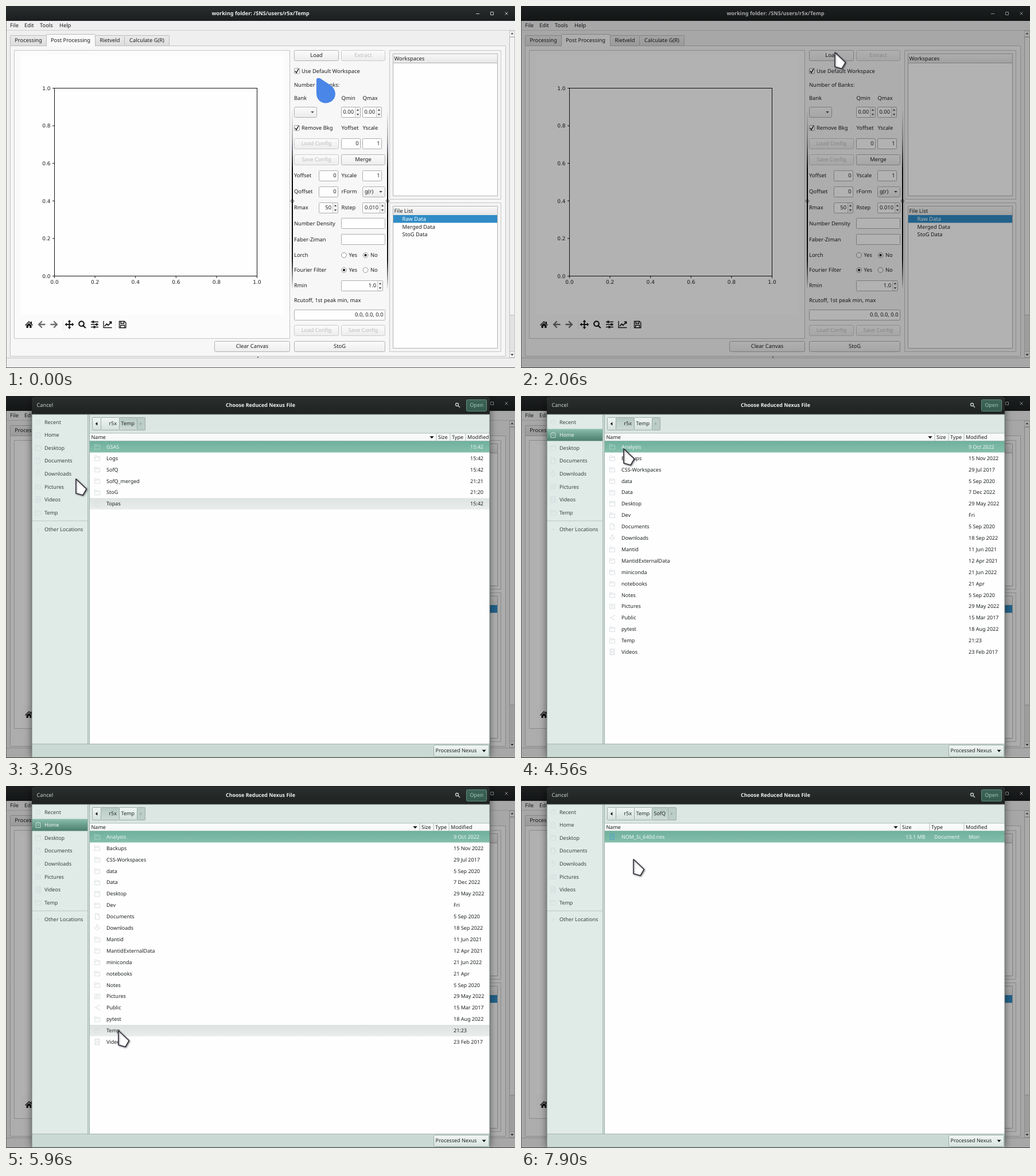
Recreate the animation shown at these times as an HTML page with a canvas. Size 887 px wide and 632 px high, loop 8000 ms.

```html
<!DOCTYPE html>
<html lang="en">
<head>
<meta charset="utf-8">
<title>Choosing a file</title>
<style>
html, body { margin: 0; width: 100%; height: 100%; overflow: hidden; background: #efefef; }
canvas { display: block; }
</style>
</head>
<body>
<canvas id="stage" width="887" height="632"></canvas>
<script>
const LOOP = 8000;
const ctx = document.getElementById('stage').getContext('2d');
ctx.textRendering = 'geometricPrecision';

// ---------- drawing helpers ----------
// y is the middle of the capitals; baselines sit on whole pixels
function text(str, x, y, { color = '#1c1f20', align = 'left', size = 9.35, weight = 400, family = '"Noto Sans", sans-serif' } = {}) {
  ctx.font = `${weight} ${size}px ${family}`;
  ctx.fillStyle = color;
  ctx.textAlign = align;
  ctx.fillText(str, x, Math.round(y + 3.3));
}
function fill(x, y, w, h, color) {
  ctx.fillStyle = color;
  ctx.fillRect(x, y, w, h);
}
function vGradient(y, h, ...colors) {
  const g = ctx.createLinearGradient(0, y, 0, y + h);
  colors.forEach((c, i) => g.addColorStop(i / (colors.length - 1), c));
  return g;
}
function box(x, y, w, h, bg, border, radius = 0) {
  ctx.beginPath();
  ctx.roundRect(x + .5, y + .5, w - 1, h - 1, radius);
  if (bg) { ctx.fillStyle = bg; ctx.fill(); }
  if (border) { ctx.strokeStyle = border; ctx.lineWidth = 1; ctx.stroke(); }
}
function path(d, x, y, { stroke, fill: bg, width = 1 }) {
  const p = new Path2D(d);
  ctx.save();
  ctx.translate(x, y);
  if (bg) { ctx.fillStyle = bg; ctx.fill(p); }
  if (stroke) { ctx.strokeStyle = stroke; ctx.lineWidth = width; ctx.stroke(p); }
  ctx.restore();
}
const UP = 'M-2.3 1.2L0-1.5 2.3 1.2Z', DOWN = 'M-2.8-1.4L0 1.6 2.8-1.4Z';

// ---------- main window ----------
function button(label, x, y, w, { enabled = true, pressed = false } = {}) {
  const bg = pressed ? vGradient(y, 19, '#cdcdcd', '#dcdcdc') : vGradient(y, 19, '#fcfcfc', '#ececec');
  box(x, y, w, 19, bg, enabled ? '#b0b0b0' : '#cacaca', 2);
  text(label, x + w / 2, y + 9, { align: 'center', color: enabled ? '#1c1f20' : '#bcbcbc' });
}
function field(value, x, y, w, spin) {
  box(x, y, w, 19, '#fefefe', '#adadad', 1);
  text(value, x + w - (spin ? 12 : 3.5), y + 9, { align: 'right' });
  if (!spin) return;
  fill(x + w - 10, y + 1, 9, 17, '#f4f4f4');
  fill(x + w - 10, y + 1, 1, 17, '#c8c8c8');
  path(UP, x + w - 5, y + 5.5, { fill: '#444' });
  path('M-2.3-1.2L0 1.5 2.3-1.2Z', x + w - 5, y + 13.5, { fill: '#444' });
}
function combo(value, x, y, w) {
  box(x, y, w, 19, vGradient(y, 19, '#fbfbfb', '#ebebeb'), '#b0b0b0', 2);
  text(value, x + 4, y + 9);
  path(DOWN, x + w - 8, y + 9.5, { fill: '#444' });
}
function check(label, y) {
  box(502, y - 5, 10, 10, '#fff', '#999', 1);
  path('M-3 0L-1 3 3-4', 507, y, { stroke: '#222', width: 1.5 });
  text(label, 515, y);
}
function radio(label, x, y, on) {
  ctx.beginPath();
  ctx.arc(x, y, 4.4, 0, 7);
  ctx.fillStyle = '#fff'; ctx.fill();
  ctx.strokeStyle = '#929292'; ctx.lineWidth = 1; ctx.stroke();
  if (on) { ctx.beginPath(); ctx.arc(x, y, 2.2, 0, 7); ctx.fillStyle = '#222'; ctx.fill(); }
  text(label, x + 8.5, y);
}
function tree(title, y) {
  box(668, y, 195, 261, '#f4f4f4', '#c6c6c6');
  box(674, y + 6, 183, 249, '#fefefe', '#b4b4b4');
  box(674, y + 6, 183, 17, vGradient(y + 6, 17, '#f8f8f8', '#e6e6e6'), '#b4b4b4');
  text(title, 676.5, y + 14.5);
}
function splitter(x) {
  fill(x - 1, 180, 2, 315, vGradient(180, 315, 'rgba(20,20,40,0)', 'rgba(20,20,40,.35)', '#080808', '#000', '#000', '#111', 'rgba(0,0,0,0)'));
  path('M-3.5 0L-1-2.5V2.5ZM3.5 0L1-2.5V2.5Z', x, 340.5, { fill: '#fff', stroke: '#333', width: .7 });
}
function plot() {
  box(14, 77, 481, 504, '#fbfbfb', '#c4c4c4');
  fill(26, 86, 458, 453, '#fefefe');
  ctx.strokeStyle = '#111';
  ctx.lineWidth = 1;
  ctx.strokeRect(84.5, 143.5, 353, 328);
  const label = { size: 9, family: '"DejaVu Sans", sans-serif' };
  for (let i = 0; i <= 5; i++) {
    const x = 84.5 + i * 70.6, y = 471.5 - i * 65.6, value = (i / 5).toFixed(1);
    fill(x - .5, 472, 1, 3, '#111');
    fill(81, y - .5, 3, 1, '#111');
    text(value, x, 482, { ...label, align: 'center' });
    text(value, 77.5, y, { ...label, align: 'right' });
  }
}
function plotTools() {
  const y = 556, dark = '#161616', gray = '#6d6d6d';
  path('M-7 1L0-6 7 1 6 2 0-4-6 2ZM-4.5 1.5L0-2.5 4.5 1.5V6H1.2V2.5H-1.2V6H-4.5ZM3-5H5V-1L3-3Z', 40, y, { fill: dark });
  const arrow = 'M-6.5 0L0-6.5 1.5-5-2-1.3H6.5V1.3H-2L1.5 5 0 6.5Z';
  path(arrow, 62, y, { fill: gray });
  ctx.save();
  ctx.translate(168, 0);
  ctx.scale(-1, 1);
  path(arrow, 84, y, { fill: gray });
  ctx.restore();
  path('M-6 0H6M0-6V6', 110.5, y, { stroke: dark, width: 2 });
  path('M0-8L3-4.5H-3ZM0 8L3 4.5H-3ZM-8 0L-4.5-3V3ZM8 0L4.5-3V3Z', 110.5, y, { fill: dark });
  path('M3.3-1.3A4.3 4.3 0 1 1-5.3-1.3 4.3 4.3 0 1 1 3.3-1.3M2 2L6.3 6.3', 132.5, y, { stroke: dark, width: 2.2 });
  path('M-6.5-4.5H6.5M-6.5 0H6.5M-6.5 4.5H6.5', 154.5, y, { stroke: dark, width: 1.5 });
  path('M-4-6.5H-1V-2.5H-4ZM2-2H5V2H2ZM-2 2.5H1V6.5H-2Z', 154.5, y, { fill: dark });
  path('M-7-6V5.5H7.5', 177, y, { stroke: dark, width: 1.3 });
  path('M-5 3L-1.5-1 1 1.5 6-4M2.8-4.7H6.5V-1', 177, y, { stroke: dark, width: 1.8 });
  path('M-5.5-5.5H3.5L5.8-3V5.8H-5.5ZM-3-5V-1.8H2.5V-5M-3.3 5V1.2H3.5V5', 203, y, { stroke: dark, width: 1.4 });
  fill(99, 548, 1, 16, '#e6e6e6');
  fill(190, 548, 1, 16, '#e6e6e6');
}
function controls(pressed) {
  button('Load', 502, 77, 78, { pressed });
  button('Extract', 584, 77, 77, { enabled: false });
  check('Use Default Workspace', 113.5);
  text('Number of Banks:', 502, 138);
  text('Bank', 502, 160.5);
  text('Qmin', 584.5, 160.5);
  text('Qmax', 621.5, 160.5);
  combo('', 502, 176, 40);
  field('0.00', 584, 176, 34, true);
  field('0.00', 621, 176, 34, true);
  check('Remove Bkg', 213);
  text('Yoffset', 584.5, 213);
  text('Yscale', 621.5, 213);
  button('Load Config', 502, 231, 78, { enabled: false });
  field('0', 584, 231, 34);
  field('1', 621, 231, 34);
  button('Save Config', 502, 259, 78, { enabled: false });
  button('Merge', 584, 259, 77);
  text('Yoffset', 502, 296);
  field('0', 545, 287, 34);
  text('Yscale', 584.5, 296);
  field('1', 621, 287, 34);
  text('Qoffset', 502, 324);
  field('0', 545, 315, 34);
  text('rForm', 584.5, 324);
  combo('g(r)', 621, 315, 40);
  text('Rmax', 502, 352);
  field('50', 545, 343, 34, true);
  text('Rstep', 584.5, 352);
  field('0.010', 621, 343, 40, true);
  text('Number Density', 502, 380);
  field('', 584, 370, 77);
  text('Faber-Ziman', 502, 408);
  field('', 584, 398, 77);
  text('Lorch', 502, 435);
  text('Fourier Filter', 502, 461);
  [[435, false], [461, true]].forEach(([y, yes]) => {
    radio('Yes', 589, y, yes);
    radio('No', 626.5, y, !yes);
  });
  text('Rmin', 502, 488);
  field('1.0', 584, 479, 73, true);
  text('Rcutoff, 1st peak min, max', 502, 514);
  field('0.0, 0.0, 0.0', 502, 530, 159);
  button('Load Config', 502, 557, 78, { enabled: false });
  button('Save Config', 584, 557, 77, { enabled: false });
  button('Clear Canvas', 363, 585, 132);
  button('StoG', 502, 585, 159);
}
function mainWindow(pressed) {
  fill(0, 0, 887, 632, '#efefef');
  fill(0, 0, 887, 26, vGradient(0, 26, '#2a2e2f', '#1b1e1f'));
  text('working folder: /SNS/users/r5x/Temp', 443.5, 13, { color: '#eee', align: 'center', size: 9.2, weight: 700 });
  fill(819, 13, 6, 1, '#ccc');
  box(844, 10, 6, 6, null, '#ccc');
  path('M-2.5-2.5L2.5 2.5M2.5-2.5L-2.5 2.5', 872, 13, { stroke: '#ccc' });
  [['File', 7], ['Edit', 32], ['Tools', 59], ['Help', 93]].forEach(([s, x]) => text(s, x, 33.5));
  fill(0, 42, 887, 1, '#cfcfcf');

  box(7, 69, 864, 543, '#f7f7f7', '#c2c2c2');
  [['Processing', 7, 64], ['Rietveld', 155, 52], ['Calculate G(R)', 206, 79]].forEach(([s, x, w]) => {
    box(x, 51, w, 19, vGradient(51, 19, '#ebebeb', '#dcdcdc'), '#bcbcbc', 1);
    text(s, x + w / 2, 60, { align: 'center' });
  });
  box(70, 49, 86, 22, '#f9f9f9', '#bcbcbc', 1);
  fill(71, 69, 84, 3, '#f8f8f8');
  text('Post Processing', 112.5, 59.5, { align: 'center' });

  plot();
  plotTools();
  controls(pressed);
  splitter(499);
  splitter(665);
  tree('Workspaces', 77);
  tree('File List', 343);
  fill(675, 365, 181, 13.5, '#308cc6');
  text('Raw Data', 690.5, 372, { color: '#fff' });
  text('Merged Data', 690.5, 385.5);
  text('StoG Data', 690.5, 398.5);

  box(877, 43, 10, 571, '#e2e2e2', '#c6c6c6');
  box(877, 54, 10, 486, '#f3f3f3', '#bcbcbc');
  box(877, 43, 10, 11, '#f3f3f3', '#c6c6c6');
  box(877, 603, 10, 11, '#f3f3f3', '#c6c6c6');
  path(UP, 882, 48, { fill: '#333' });
  path(DOWN, 882, 609, { fill: '#333' });
  fill(0, 614, 887, 1, '#c4c4c4');
  fill(438, 612.5, 2, 1.5, '#555');
  fill(0, 26, 1, 606, '#8a8a8a');
  fill(0, 631, 887, 1, '#5a5a5a');
}

// ---------- file dialog ----------
const PLACES = ['Recent', 'Home', 'Desktop', 'Documents', 'Downloads', 'Pictures', 'Videos', 'Temp'];
const TEMP_ROWS = ['GSAS|15:42', 'Logs|15:42', 'SofQ|15:42', 'SofQ_merged|21:21', 'StoG|21:20', 'Topas|15:42'];
const HOME_ROWS = ['Analysis|9 Oct 2022', 'Backups|15 Nov 2022', 'CSS-Workspaces|29 Jul 2017', 'data|5 Sep 2020',
  'Data|7 Dec 2022', 'Desktop|29 May 2022', 'Dev|Fri', 'Documents|5 Sep 2020', 'Downloads|18 Sep 2022',
  'Mantid|11 Jun 2021', 'MantidExternalData|12 Apr 2021', 'miniconda|21 Jun 2022', 'notebooks|21 Apr',
  'Notes|5 Sep 2020', 'Pictures|29 May 2022', 'Public|15 Mar 2017', 'pytest|18 Aug 2022', 'Temp|21:23', 'Videos|23 Feb 2017'];
// cols: left edges of Size, Type and Modified
const FOLDERS = {
  start: { rows: TEMP_ROWS, cols: [750, 774, 801], dateX: 809, crumbs: 2, active: 1 },
  home: { rows: HOME_ROWS, cols: [721, 745, 772], dateX: 780, crumbs: 2, active: 0 },
  temp: { rows: TEMP_ROWS, cols: [721, 745, 772], dateX: 780, crumbs: 2, active: 1 },
  sofq: { rows: ['NOM_Si_640d.nxs|Mon'], cols: [661, 712, 772], dateX: 780, crumbs: 3, active: 2 },
};
const ROW_TOP = 78.7, ROW_H = 19.9;

const ICONS = {
  folder: 'M-4.5-4H-1L0-2.5H4.5V4.5H-4.5ZM-4.5-1H1L2-2.5',
  Documents: 'M-3.5-5H1L3.5-2.5V5H-3.5ZM1-5V-2.5H3.5',
  Downloads: 'M-1.5-5H1.5V0H4.5L0 4.5-4.5 0H-1.5Z',
  Pictures: 'M-4.5-3.5H4.5V4H-4.5ZM2 0A2 2 0 1 1-2 0 2 2 0 1 1 2 0',
  Videos: 'M-4-5H4V5H-4ZM-2-5V5M2-5V5M-2 0H2',
  Desktop: 'M-4.5-4H4.5V4.5H-4.5ZM-4.5-2H4.5',
  Public: 'M4-4L-3 0 4 4M-3-1V1M4-5V-3M4 3V5',
  Home: 'M-4-3H-1.5V-4.5H1.5V-3H4V4.5H-4ZM-1.5 0H1.5',
  Recent: 'M4 0A4 4 0 1 1-4 0 4 4 0 1 1 4 0M0-2V0H2',
};
const icon = (name, x, y, color) => path(ICONS[name] || ICONS.folder, x, y, { stroke: color });
const small = (str, x, y, opts) => text(str, x, y, { size: 9, ...opts });

function sidebar(selected) {
  fill(45, 32, 98, 575, '#e0eae7');
  PLACES.forEach((name, i) => {
    const y = 45.4 + i * 22.57, on = name === selected;
    if (on) fill(45, y - 10.5, 98, 21, vGradient(y - 10.5, 21, '#8dbfae', '#689d8b', '#4c7e6e'));
    icon(name, 56, y, on ? '#c4dcd3' : '#d3dddf');
    small(name, 67, y, { color: on ? '#f4faf7' : '#37413e' });
  });
  fill(45, 217.5, 98, 1, '#bccac5');
  path('M-3 0H3M0-3V3', 56, 233, { stroke: '#d5dfde' });
  small('Other Locations', 67, 232.5, { color: '#37413e' });
  fill(142, 32, 4, 575, '#c9d8d3');
  fill(142, 32, 1, 575, '#a6b9b2');
  fill(145, 32, 1, 575, '#9fb2ab');
}
function pathBar({ crumbs, active }) {
  fill(146, 32, 697, 33, '#dce6e3');
  const parts = ['', 'r5x', 'Temp', 'SofQ'].slice(0, crumbs + 1).concat('');
  const edges = [150, 165, 197, 228, 256].slice(0, crumbs + 2);
  edges.push(edges[crumbs + 1] + 14);
  parts.forEach((label, i) => {
    const x = edges[i], w = edges[i + 1] - x + 1, last = i === parts.length - 1;
    const bg = i === active + 1 ? vGradient(37, 23, '#b8cac3', '#cddad5') : last ? '#bccdc7' : vGradient(37, 23, '#f0f6f4', '#d3e0db');
    box(x, 37, w, 23, bg, '#9aaea7', 1);
    if (label) small(label, edges[i + 1] - 4, 48, { align: 'right', color: '#1d2624' });
  });
  path('M1.8-3V3L-1.8 0Z', 157.5, 48.5, { fill: '#111' });
  path('M-1.5-2.5V2.5L1.5 0Z', edges[crumbs + 1] + 7, 48.5, { fill: '#93a59e' });
}
function fileList({ rows, cols, dateX }, selected, hovered) {
  fill(146, 65, 697, 14, vGradient(65, 14, '#fcfdfd', '#f3f6f5'));
  fill(146, 64.5, 697, 1, '#aebeb8');
  fill(146, 78, 697, 1, '#aebeb8');
  small('Name', 148.5, 71.5);
  path('M-3.8-1.8H3.8L0 2.2Z', cols[0] - 8, 72, { fill: '#111' });
  ['Size', 'Type', 'Modified'].forEach((s, i) => {
    fill(cols[i] - .5, 65, 1, 13, '#aebeb8');
    small(s, cols[i] + 3, 71.5);
  });
  fill(146, 79, 697, 528, '#fefefe');
  rows.forEach((row, i) => {
    const [name, date] = row.split('|'), top = ROW_TOP + i * ROW_H, y = top + 9.8;
    const on = i === selected, color = on ? '#eef7f3' : '#1c2221', isFile = name.endsWith('.nxs');
    if (on) fill(146, top, 697, ROW_H, vGradient(top, ROW_H, '#6fb09c', '#85bfac'));
    else if (i === hovered) fill(146, top, 697, ROW_H, vGradient(top, ROW_H, '#dde3e1', '#e9edec'));
    icon(isFile ? 'Documents' : name, 159, y, isFile ? '#4aa3c8' : on ? '#a6d0c3' : '#d9dee1');
    if (isFile) {
      path('M-2-1H2M-2 1.5H2', 159, y, { stroke: '#4aa3c8' });
      small('13.1 MB', 704.5, y, { align: 'right', color });
      small('Document', 720, y, { color });
    }
    small(name, 175, y, { color });
    small(date, dateX, y, { color });
  });
}
function dialog(folder, place, selected, hovered) {
  ctx.save();
  ctx.shadowColor = 'rgba(0,0,0,.55)';
  ctx.shadowBlur = 13;
  fill(45, 4, 798, 627, '#cbd9d5');
  ctx.restore();
  ctx.beginPath();
  ctx.roundRect(45, 1, 798, 31, [5, 5, 0, 0]);
  ctx.fillStyle = vGradient(1, 31, '#2b302f', '#1e2221');
  ctx.fill();
  small('Cancel', 53.5, 16, { color: '#c9d1ce', size: 9.2 });
  text('Choose Reduced Nexus File', 443.5, 16, { align: 'center', color: '#eef2f0', size: 8.95, weight: 700 });
  path('M1.5-1A2.5 2.5 0 1 1-3.5-1 2.5 2.5 0 1 1 1.5-1M1 1L4 4', 787, 16, { stroke: '#ccd3d0', width: 1.3 });
  box(802, 6, 36, 21, vGradient(6, 21, '#3d6457', '#345a4d'), '#64907f', 2);
  small('Open', 820, 16, { align: 'center', color: '#9cc5b5', size: 9.2 });
  sidebar(place);
  pathBar(folder);
  fileList(folder, selected, hovered);
  fill(45, 607, 798, 24, '#cbd9d5');
  fill(45, 607, 798, 1, '#a3b5ae');
  box(745, 609, 97, 21, vGradient(609, 21, '#f1f6f4', '#d7e3de'), '#9aaea7', 2);
  small('Processed Nexus', 748.5, 619);
  path('M-3.5-1.8H3.5L0 2.2Z', 833, 619.5, { fill: '#111' });
  ctx.strokeStyle = '#6c7a75';
  ctx.lineWidth = 1;
  ctx.strokeRect(45, 32, 798, 599);
}

// ---------- pointer ----------
const TRACK = [
  [0, 541, 126], [30, 541, 126], [330, 538, 101], [630, 547, 81],
  [2860, 547, 81], [3030, 350, 186], [3200, 122, 145], [3450, 84, 82], [3630, 76, 67],
  [4230, 76, 67], [4560, 179, 92], [5030, 186, 220], [5600, 197, 405], [5860, 196, 427],
  [6350, 196, 427], [6700, 213, 188], [6800, 210, 142], [7050, 201, 126], [7530, 196, 128], [LOOP, 196, 128],
];
function pointerAt(t) {
  const i = Math.max(1, TRACK.findIndex(k => k[0] >= t));
  const [t0, x0, y0] = TRACK[i - 1], [t1, x1, y1] = TRACK[i];
  const u = Math.max(0, (t - t0) / (t1 - t0));
  return [x0 + (x1 - x0) * u, y0 + (y1 - y0) * u];
}
function drawPointer(t) {
  const [x, y] = pointerAt(t);
  if (t < 330) {
    path('M0 3C0-1 5-1 9 2L24 12C34 19 36 31 28 39 20 46 7 45 2 35-1 30 0 20 0 3Z', x, y, { fill: '#4a86e8' });
    return;
  }
  ctx.save();
  ctx.shadowColor = 'rgba(0,0,0,.45)';
  ctx.shadowBlur = 3;
  ctx.shadowOffsetX = ctx.shadowOffsetY = 1;
  ctx.lineJoin = 'round';
  path('M0 0L0 25 12 28.5 18.5 17.5Z', x, y, { fill: '#fff', stroke: '#35303b', width: 1.6 });
  ctx.restore();
}

// ---------- timeline ----------
function hoveredRow(t) {
  if (t > 3050 && t < 3830) return 5;
  const [x, y] = pointerAt(t - 100);
  return x < 146 ? -1 : Math.floor((y - ROW_TOP) / ROW_H);
}
function draw(t) {
  mainWindow(t >= 800 && t < 1000);
  if (t >= 2060) fill(0, 0, 887, 632, 'rgba(0,0,0,.3)');
  if (t >= 2400) {
    const view = t < 3830 ? 'start' : t < 6230 ? 'home' : t < 7760 ? 'temp' : 'sofq';
    const place = t < 3700 ? '' : t < 6230 ? 'Home' : t < 7760 ? 'Temp' : '';
    const selected = view === 'home' && t >= 6030 ? 17 : view === 'temp' && t >= 7630 ? 2 : 0;
    dialog(FOLDERS[view], place, selected, hoveredRow(t));
  }
  drawPointer(t);
}
const start = performance.now();
function tick() {
  draw((performance.now() - start) % LOOP);
  requestAnimationFrame(tick);
}
tick();
</script>
</body>
</html>
```
